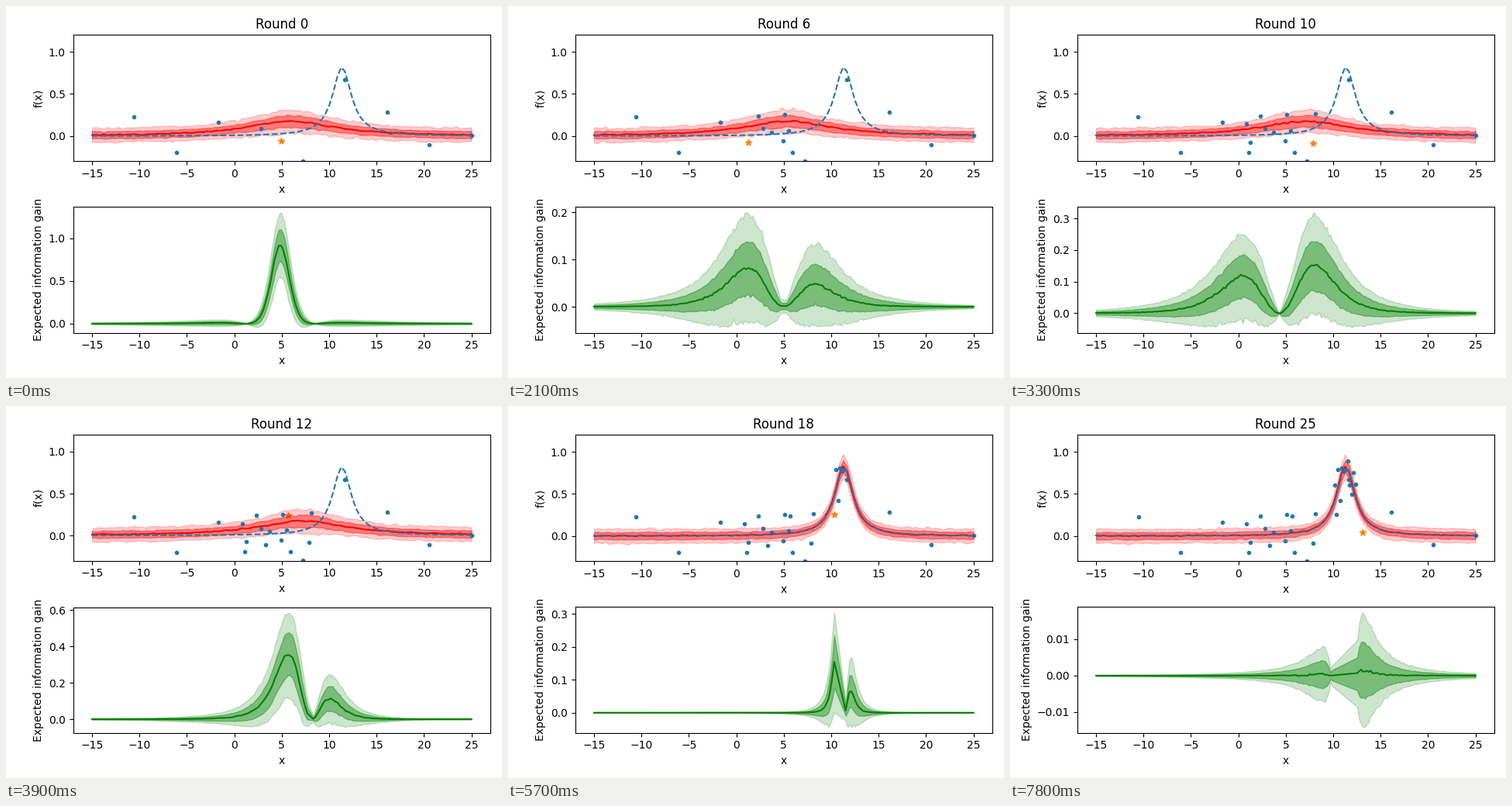
Write a matplotlib script that moves like this. It is 640x480 px and loops after 8 s.

```python
import numpy as np
import matplotlib.pyplot as plt
from matplotlib.animation import FuncAnimation

INTERVAL, LOOP = 100, 8000
LAST_ROUND = 25
GRID = np.linspace(-15, 25, 100)
DESIGNS = np.linspace(-15, 25, 200)
TRUTH = .82, 11.35, 1.2

START_X = np.linspace(-15, 25, 10)[1:]
START_Y = [.227, -.199, .16, .088, -.292, .67, .28, -.107, .005]

# Key rounds of the two rival curves: height, centre and width of each.
KEY_ROUNDS = [0, 3, 6, 10, 14, 21, 25]
RIVALS = np.array([
    [1.53, 4.85, 2.2, .569, 4.85, 5.8],
    [.569, 5.9, 5, .424, 5.9, 7],
    [.5, 2.3, 5, .449, 7, 5],
    [.639, 1.9, 5.5, .7, 7.05, 5],
    [1.3, 10.75, .8, .892, 11.4, 1],
    [.74, 11.05, 1.15, .72, 11.8, 1.15],
    [.73, 11.36, 1.365, .97, 11.29, 1.035],
])


def peak(x, height, centre, width):
    return height / (1 + ((x - centre) / width) ** 2)


def disagreement(x, rnd):
    rivals = [np.interp(rnd, KEY_ROUNDS, column) for column in RIVALS.T]
    return np.abs(peak(x, *rivals[:3]) - peak(x, *rivals[3:]))


def posterior(rnd):
    """Height, centre, width and relative spread of the fitted curve."""
    if rnd < 14:
        return .175, 6 - 1.2 * np.sin(np.pi * rnd / 7.5), 5.7, .32
    settled = min(1, (rnd - 14) / 4)
    return .87 - .04 * settled, 11.06 + .25 * settled, 1.18, .155 - .085 * settled


def choose_designs():
    """Most informative design each round; near the true peak, work outwards."""
    outward = sorted(range(125, 137), key=lambda i: abs(i - 128.9))
    picks = []
    for rnd in range(LAST_ROUND + 1):
        if 13 <= rnd < LAST_ROUND:
            picks.append(outward[rnd - 13])
        else:
            gain = disagreement(DESIGNS, rnd)
            gain[picks] = 0
            picks.append(int(gain.argmax()))
    return picks


PICKS = choose_designs()
PICK_X = DESIGNS[PICKS]
PICK_Y = peak(PICK_X, *TRUTH) + .23 * np.sin(1.694 * np.arange(LAST_ROUND + 1) - .37)


def draw_bands(ax, x, mean, sd, color, rng, rough):
    def wobble():
        return rng.normal(0, rough, len(x))

    for k, alpha in ((2, .2), (1, .4)):
        ax.fill_between(x, mean - k * sd * (1 + wobble()),
                        mean + k * sd * (1 + wobble()),
                        color=color, alpha=alpha)
    ax.plot(x, mean + sd * wobble(), color=color)


def draw_fit(ax, rnd, rng):
    ax.scatter(PICK_X[rnd], PICK_Y[rnd], s=36, marker="*", color="C1")
    ax.plot([*START_X, *PICK_X[:rnd]], [*START_Y, *PICK_Y[:rnd]], ".", color="C0")
    *shape, spread = posterior(rnd)
    mean = peak(GRID, *shape)
    draw_bands(ax, GRID, mean, np.hypot(.042, spread * mean), "red", rng, .08)
    ax.plot(GRID, peak(GRID, *TRUTH), "--", color="C0")
    ax.set_ylim(-.3, 1.2)
    ax.set_ylabel("f(x)")
    ax.set_title(f"Round {rnd}")


def draw_gain(ax, rnd, rng):
    x = np.delete(DESIGNS, PICKS[:rnd])
    diff = disagreement(x, rnd)
    draw_bands(ax, x, diff ** 2, .2 * diff, "green", rng, .035)
    ax.set_ylabel("Expected information gain")


def update(frame):
    rnd = max(0, frame * INTERVAL // 300 - 1)
    if fig.axes and fig.axes[0].get_title() == f"Round {rnd}":
        return
    fig.clear()
    # Start from the default margins so the tight layout depends on the round only.
    fig.subplots_adjust(left=.125, bottom=.11, right=.9, top=.88,
                        wspace=.2, hspace=.2)
    rng = np.random.default_rng(rnd)
    for ax, draw in zip(fig.subplots(2), (draw_fit, draw_gain)):
        draw(ax, rnd, rng)
        ax.set_xlim(-17, 27)
        ax.set_xlabel("x")
    fig.tight_layout()


fig = plt.figure(figsize=(6.4, 4.8), dpi=100)
anim = FuncAnimation(fig, update, frames=LOOP // INTERVAL, interval=INTERVAL,
                     repeat=True, repeat_delay=0)
plt.show()
```
